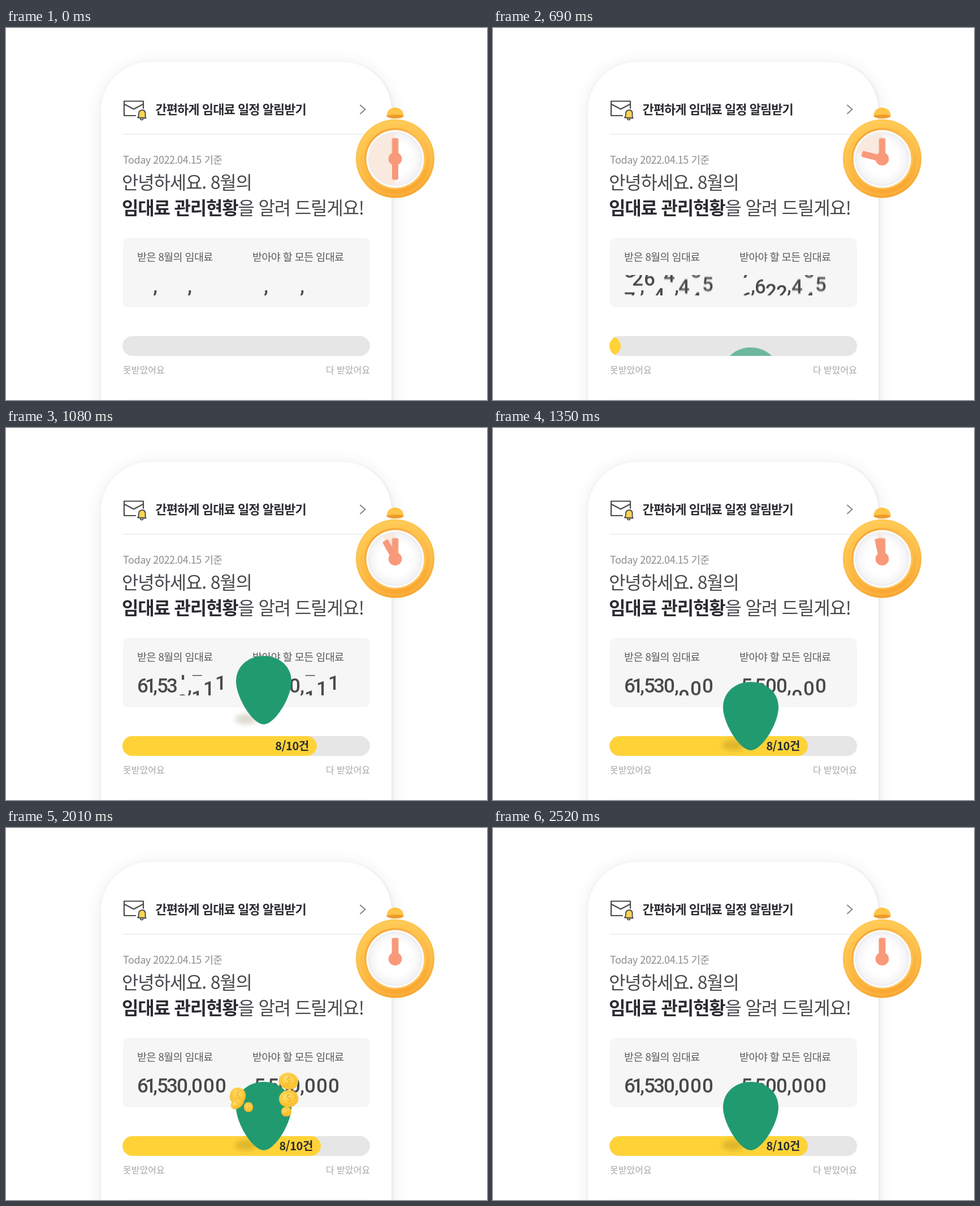
These frames come from a looping animation (851 px wide and 658 px high, 2.55 s). An HTML page:

```html
<!DOCTYPE html>
<html lang="ko">
<head>
<meta charset="utf-8">
<title>임대료 관리현황</title>
<style>
  html, body { margin: 0; width: 100%; height: 100%; overflow: hidden; background: #fff; }
  svg { display: block; width: 851px; height: 658px; font-family: "Noto Sans CJK KR", "Noto Sans CJK", "Noto Sans", sans-serif; }
  .light { font-weight: 300; font-family: "Noto Sans CJK KR Light", "Noto Sans CJK KR", "Noto Sans CJK", sans-serif; }
  .bold { font-weight: 700; font-family: "Noto Sans CJK KR", "Noto Sans CJK", sans-serif; }
  .big { font-size: 32px; letter-spacing: -1.2px; fill: #48484d; }
  .big .bold { fill: #2b2b30; }
  .label { font-size: 18.5px; letter-spacing: -.6px; fill: #5a5a5f; }
  .small { font-size: 16px; fill: #a6a6a6; }
  .amount { font: 500 35px Roboto, "Noto Sans", sans-serif; fill: #4a4a4d; text-anchor: middle; }

  #hand, #pie, #fill, #count, #hero, .coin { animation: 2550ms linear infinite; }
  #hand { transform-origin: 688.5px 231.5px; animation-name: hand; }
  #pie { animation-name: pie; }
  #fill { animation-name: fill; }
  #count { animation-name: count; }
  #hero { transform-origin: 456px 570px; animation-name: hero; }
  .coin { animation-name: coin; }

  @keyframes hand {
    0% { transform: rotate(180deg); animation-timing-function: cubic-bezier(.29, .02, .2, 1); }
    78.8%, 100% { transform: rotate(360deg); }
  }
  @keyframes pie {
    0% { stroke-dasharray: 180 360; animation-timing-function: cubic-bezier(.29, .02, .2, 1); }
    78.8%, 100% { stroke-dasharray: 0 360; }
  }
  @keyframes fill {
    0%, 24.7% { transform: translateX(-352px); animation-timing-function: cubic-bezier(.3, 0, .2, 1); }
    46.4%, 100% { transform: none; }
  }
  @keyframes count {
    0%, 27.1% { opacity: 0; }
    30%, 100% { opacity: 1; }
  }
  @keyframes hero {
    0%, 25.88% { transform: translateY(135px); opacity: 0; animation-timing-function: cubic-bezier(.3, .3, .4, 1); }
    29% { opacity: 1; }
    40% { transform: translateY(-48px); animation-timing-function: cubic-bezier(.4, 0, .9, .7); }
    52.94% { transform: none; animation-timing-function: ease-out; }
    57% { transform: scale(1.07, .95); animation-timing-function: ease-in-out; }
    61.18% { transform: scale(1.05, .975); animation-timing-function: ease-out; }
    66.67%, 100% { transform: none; opacity: 1; }
  }
  @keyframes coin {
    0%, 60% { transform: translate(0, 0) scale(.6); opacity: 0; animation-timing-function: cubic-bezier(.4, 0, .4, 1); }
    62.5% { opacity: .8; }
    66% { opacity: 1; }
    78.82% { transform: translate(var(--x), var(--y)); opacity: 1; animation-timing-function: ease-in; }
    84% { opacity: 1; }
    92%, 100% { transform: translate(calc(var(--x) * 1.25), calc(var(--y) * .95)); opacity: 0; }
  }
</style>
</head>
<body>
<svg viewBox="0 0 851 658">
  <defs>
    <filter id="soft" x="-30%" y="-30%" width="160%" height="160%"><feGaussianBlur stdDeviation="16"/></filter>
    <filter id="edge" x="-30%" y="-30%" width="160%" height="160%"><feGaussianBlur stdDeviation="3"/></filter>
    <filter id="shade" x="-60%" y="-60%" width="220%" height="220%"><feGaussianBlur stdDeviation="5"/></filter>
    <filter id="fast" filterUnits="userSpaceOnUse" x="-20" y="-510" width="40" height="540"><feGaussianBlur stdDeviation="0 4"/></filter>
    <filter id="slow" filterUnits="userSpaceOnUse" x="-20" y="-510" width="40" height="540"><feGaussianBlur stdDeviation="0 1.3"/></filter>
    <clipPath id="window"><rect x="228" y="437" width="372" height="36"/></clipPath>
    <clipPath id="track"><rect x="206" y="545" width="438" height="35" rx="17.5"/></clipPath>
    <clipPath id="ground"><rect width="851" height="580"/></clipPath>
    <linearGradient id="ring" x1=".3" y1="0" x2=".6" y2="1">
      <stop offset="0" stop-color="#ffcb55"/><stop offset=".55" stop-color="#fdbb45"/><stop offset="1" stop-color="#f8a32c"/>
    </linearGradient>
    <linearGradient id="rim" x1="0" y1="0" x2="1" y2="1">
      <stop offset="0" stop-color="#f6a02d"/><stop offset="1" stop-color="#ffd071"/>
    </linearGradient>
    <radialGradient id="face">
      <stop offset=".6" stop-color="#fff"/><stop offset=".9" stop-color="#f5f5f7"/><stop offset="1" stop-color="#ececef"/>
    </radialGradient>
    <radialGradient id="gold" cx=".4" cy=".35">
      <stop offset="0" stop-color="#ffe072"/><stop offset="1" stop-color="#fdc733"/>
    </radialGradient>
  </defs>

  <rect width="851" height="658" fill="#fff"/>
  <rect x="168" y="64" width="515" height="760" rx="86" fill="#000" opacity=".08" filter="url(#soft)"/>
  <rect x="169" y="61" width="515" height="760" rx="86" fill="#000" opacity=".06" filter="url(#edge)"/>
  <rect x="168" y="60" width="514" height="760" rx="86" fill="#fff"/>

  <g fill="none" stroke="#4a4a50" stroke-width="2.2" stroke-linejoin="round" stroke-linecap="round">
    <path d="M229 155H209V129.500H243V142M209 134.500L226 143.500L243 134.500"/>
    <path d="M233 158.500C235.500 156 234.500 153 235 150C236 144 246 143.500 246.500 150C247 153.500 245.500 157 247.500 159.500ZM237.500 160.500C238.500 163.200 241.500 163.200 242.500 161" fill="#ffd550" stroke-width="1.900"/>
    <path d="M627 136.500L635.500 144L627 151.500" stroke="#85858a" stroke-width="2"/>
  </g>
  <text class="bold" x="264.500" y="152" font-size="22" letter-spacing="-.95" fill="#2b2b30">간편하게 임대료 일정 알림받기</text>
  <path d="M207 188H644" stroke="#ebebed" stroke-width="1.500"/>

  <text class="light" x="207" y="240" font-size="18" letter-spacing="-.45" fill="#8c8c91">Today 2022.04.15 기준</text>
  <text class="big light" x="205" y="285">안녕하세요. 8월의</text>
  <text class="big light" x="205" y="330"><tspan class="bold">임대료 관리현황</tspan>을 알려 드릴게요!</text>

  <rect x="207" y="371" width="437" height="123" rx="10" fill="#f6f6f6"/>
  <text class="label" x="232" y="412">받은 8월의 임대료</text>
  <text class="label" x="436" y="411.500">받아야 할 모든 임대료</text>
  <g id="amounts" class="amount" clip-path="url(#window)"></g>

  <g clip-path="url(#track)">
    <rect x="206" y="545" width="438" height="35" fill="#e6e6e6"/>
    <g id="fill">
      <rect x="206" y="545" width="351" height="35" rx="17.500" fill="#ffd338"/>
      <text id="count" class="bold" x="543" y="570" font-size="20" letter-spacing="-.4" text-anchor="end" fill="#2b2b30">8/10건</text>
    </g>
  </g>
  <text class="small light" x="207" y="611">못받았어요</text>
  <text class="small light" x="644" y="611" text-anchor="end">다 받았어요</text>
  <path d="M207 657.500H644" stroke="#f7f7f7"/>

  <g clip-path="url(#ground)">
    <g id="hero">
      <ellipse cx="425" cy="561" rx="20" ry="9" fill="#5a4300" opacity=".2" filter="url(#shade)"/>
      <path d="M456 449C484 449 505 468 505 494C505 522 476 570 456 570C436 570 407 522 407 494C407 468 428 449 456 449Z" fill="#219a70"/>
    </g>
  </g>
  <g id="coins" transform="translate(460 556)"></g>

  <ellipse cx="688.500" cy="155.500" rx="15" ry="4.500" fill="#ef9a2c"/>
  <path d="M673.500 155C674 136 703 136 703.500 155C698 152.500 679 152.500 673.500 155Z" fill="#ffc548"/>
  <circle cx="688.500" cy="231" r="69.500" fill="url(#ring)"/>
  <circle cx="688.500" cy="231" r="64" fill="none" stroke="#ffd877" stroke-width="4" opacity=".2"/>
  <circle cx="688.500" cy="231" r="54" fill="url(#rim)"/>
  <circle cx="688.500" cy="231.500" r="51" fill="#fdfdfd"/>
  <circle cx="688.500" cy="231.500" r="48" fill="url(#face)"/>
  <circle id="pie" r="23" fill="none" stroke="#f9e9df" stroke-width="46" pathLength="360" transform="translate(688.500 231.500) scale(-1 1) rotate(-90)"/>
  <rect x="683" y="195" width="11" height="37" rx="2" fill="#f79a78" stroke="#fbb9a0" stroke-width="1.200"/>
  <rect id="hand" x="683" y="194.500" width="11" height="37" rx="2.500" fill="#f8997a"/>
  <circle cx="688.500" cy="231.500" r="11.800" fill="#f8997a"/>
</svg>

<script>
  const LOOP = 2550, PITCH = 51;

  function make(parent, tag, attrs, text = '') {
    const el = document.createElementNS('http://www.w3.org/2000/svg', tag);
    for (const k in attrs) el.setAttribute(k, attrs[k]);
    el.textContent = text;
    return parent.appendChild(el);
  }

  function play(el, frames) {
    el.animate(frames.map(([at, style, easing = 'linear']) => ({ offset: at / LOOP, easing, ...style })),
      { duration: LOOP, iterations: Infinity });
  }

  // A wheel counts down ten steps to its digit, slowing as it stops.
  function wheel(x, digit, start, stop) {
    const at = make(amounts, 'g', { transform: `translate(${x} 468)` });
    const strip = make(at, 'g', {});
    for (let k = 0; k < 10; k++) make(strip, 'text', { y: -k * PITCH }, (digit + k) % 10);
    const low = { transform: `translateY(${10 * PITCH}px)` }, rest = { transform: 'translateY(0px)' };
    play(strip, [[0, low], [start, low, 'cubic-bezier(.333, .667, .667, 1)'], [stop, rest], [LOOP, rest]]);
    const part = f => start + (stop - start) * f;
    play(strip, [
      [0, { filter: 'url(#fast)' }, 'step-end'],
      [part(.25), { filter: 'url(#slow)' }, 'step-end'],
      [part(.5), { filter: 'none' }, 'step-end'],
      [LOOP, { filter: 'none' }]
    ]);
  }

  const amounts = document.getElementById('amounts');
  for (const x of [264, 325, 460, 524]) make(amounts, 'text', { x, y: 468 }, ',');

  [
    [242, 6, 437, 850], [256, 1, 352, 820], [277, 5, 352, 820], [294, 3, 268, 935], [312, 0, 271, 1330],
    [449, 5, 358, 900], [473, 5, 291, 880], [492, 0, 385, 960], [511, 0, 391, 960]
  ].forEach(w => wheel(...w));
  for (const x of [338, 538]) {
    wheel(x, 0, 140, 1650);
    wheel(x + 21, 0, 311, 1462);
    wheel(x + 42, 0, 405, 1371);
  }

  const coins = document.getElementById('coins');
  [
    [-50, -83, 14, 14, 10], [-51, -70, 13, 8, -38], [-31, -63, 8, 8, 0],
    [40, -109, 17, 14, 12], [40, -78, 17, 14.5, -10], [36, -55, 9, 8, 0]
  ].forEach(([x, y, rx, ry, tilt]) => {
    const coin = make(coins, 'g', { class: 'coin', style: `--x:${x}px;--y:${y}px` });
    const disc = make(coin, 'g', { transform: `rotate(${tilt})` });
    make(disc, 'ellipse', { cy: 1.5, rx, ry, fill: '#f2ae2a' });
    make(disc, 'ellipse', { rx, ry, fill: 'url(#gold)' });
    make(disc, 'ellipse', { rx: rx * .76, ry: ry * .76, fill: 'none', stroke: '#f6b52e', 'stroke-width': 1 });
    make(disc, 'text', { y: ry * .42, 'font-size': ry * 1.15, 'text-anchor': 'middle', fill: '#eda524' }, '$');
  });
</script>
</body>
</html>
```
